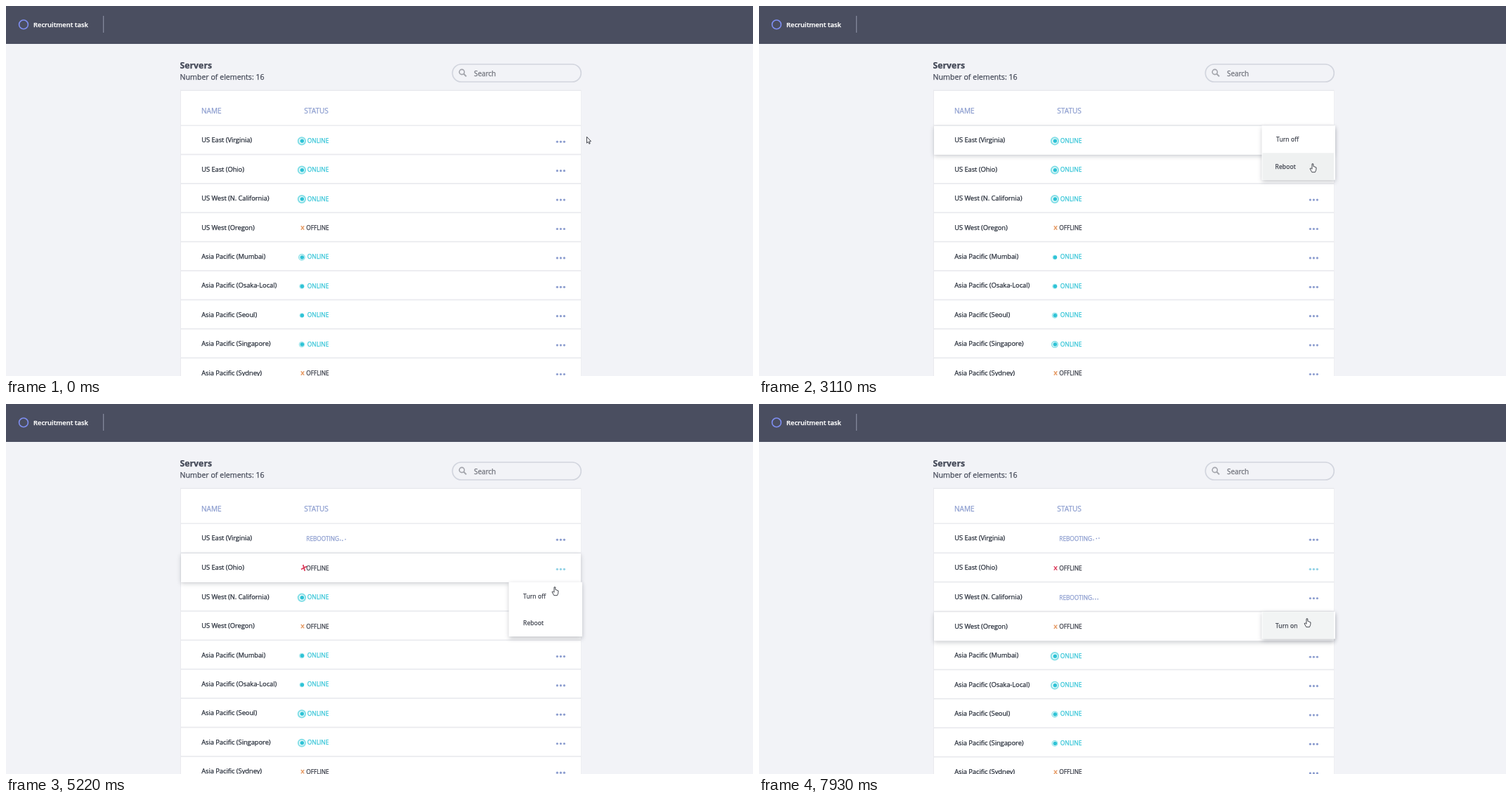
An HTML page with a canvas for the animation above (8000 ms loop, 1063x527 px).

```html
<!DOCTYPE html>
<html lang="en">
<head>
<meta charset="utf-8">
<title>Servers</title>
<style>
html, body { margin: 0; width: 100%; height: 100%; overflow: hidden; background: #f2f3f7; }
canvas { display: block; }
</style>
</head>
<body>
<canvas id="stage" width="1063" height="527"></canvas>
<script>
const c = document.getElementById('stage').getContext('2d');
const LOOP = 8000, TAU = Math.PI * 2;
const LEFT = 249, WIDTH = 569, TOP = 170, PITCH = 41.4, SHIFT = 0.67;
const FONT = '"Open Sans", sans-serif';
const TEAL = '#2fc3d6', BLUE = '#8c9dcf', INK = '#3b3f4a';

// Online servers pulse with a period and a time of the first peak
const servers = [
  { name: 'US East (Virginia)', period: 745, peak: 60 },
  { name: 'US East (Ohio)', period: 745, peak: 60 },
  { name: 'US West (N. California)', period: 745, peak: 60 },
  { name: 'US West (Oregon)' },
  { name: 'Asia Pacific (Mumbai)', period: 733, peak: 550 },
  { name: 'Asia Pacific (Osaka-Local)', period: 740, peak: 450 },
  { name: 'Asia Pacific (Seoul)', period: 810, peak: 420 },
  { name: 'Asia Pacific (Singapore)', period: 795, peak: 540 },
  { name: 'Asia Pacific (Sydney)' }
];

// Visit to each row in turn: pointer enters, menu opens, pointer reaches the
// second item, an item is clicked
const visits = [
  { enter: 700, open: 1500, second: 1900, click: 3550 },
  { enter: 3620, open: 3820, click: 4650 },
  { enter: 5290, open: 5100, second: 5330, click: 7450 },
  { enter: 7500, open: 7700, click: LOOP }
];

// Pointer moves: start, end, tip
const moves = [
  [420, 1150, 800, 191], [1310, 1450, 790, 192], [1600, 2000, 788, 224],
  [3520, 3900, 787, 231], [4680, 5000, 781, 260], [5220, 5600, 780, 305]
];

const ease = v => {
  v = Math.max(0, Math.min(1, v));
  return v * v * (3 - 2 * v);
};
const wave = turns => (1 + Math.cos(TAU * turns)) / 2;
const rebooted = (i, t) => (i === 0 || i === 2) && t >= visits[i].click;
const turnedOff = (i, t) => i === 1 && t >= visits[1].click;

// A rebooting row is a little taller
function rowY(i, t) {
  let y = TOP + i * PITCH;
  for (let k = 0; k < i; k++) if (rebooted(k, t)) y += SHIFT;
  return y;
}

// The thin outline gives small letters the weight of hinted type
function text(s, x, y, size, color, weight = 400, spacing = 0) {
  c.font = `${weight} ${size}px ${FONT}`;
  c.letterSpacing = spacing + 'px';
  c.fillStyle = c.strokeStyle = color;
  c.lineWidth = 0.25;
  c.fillText(s, x, Math.round(y));
  c.strokeText(s, x, Math.round(y));
}

function rect(x, y, w, h, color) {
  c.fillStyle = color;
  c.fillRect(x, y, w, h);
}

function disc(x, y, r, color) {
  c.fillStyle = color;
  c.beginPath();
  c.arc(x, y, r, 0, TAU);
  c.fill();
}

function ring(x, y, r, width, color) {
  c.strokeStyle = color;
  c.lineWidth = width;
  c.beginPath();
  c.arc(x, y, r, 0, TAU);
  c.stroke();
}

function line(x1, y1, x2, y2, width, color) {
  c.strokeStyle = color;
  c.lineWidth = width;
  c.beginPath();
  c.moveTo(x1, y1);
  c.lineTo(x2, y2);
  c.stroke();
}

function shadowBox(x, y, w, h, alpha) {
  c.save();
  c.shadowColor = `rgba(40,45,60,${alpha})`;
  c.shadowBlur = 6;
  c.shadowOffsetY = 2.5;
  rect(x, y, w, h, '#fff');
  c.restore();
}

function page() {
  rect(0, 0, 1063, 527, '#f2f3f7');
  rect(0, 0, 1063, 54, '#4a4e60');
  ring(25, 26.4, 6.4, 1.6, '#7f8ff2');
  text('Recruitment task', 39, 30, 9.38, '#fff', 600);
  rect(138, 14, 1.3, 24, '#83879a');
  text('Servers', 247.5, 89, 12.3, '#434857', 700);
  text('Number of elements: 16', 247.5, 105, 10.62, '#434857');
  c.beginPath();
  c.roundRect(635.3, 83, 183, 25, 12.5);
  c.strokeStyle = '#d2d5de';
  c.lineWidth = 1.7;
  c.stroke();
  ring(648.7, 94, 3.6, 1.6, '#a3a5ac');
  line(651.4, 96.8, 655, 100.4, 2, '#a3a5ac');
  text('Search', 666, 100, 9.9, '#6c6f78');
  rect(LEFT - 1, 119.5, WIDTH + 1.5, 410, '#e9eaee');
  rect(LEFT, 121, WIDTH, 48.5, '#fff');
  text('NAME', 278, 153, 10.1, BLUE);
  text('STATUS', 424.3, 153, 10.1, BLUE);
}

function cross(x, y, color, grow = 0) {
  c.save();
  c.translate(x + grow * 2, y - grow * 0.5);
  c.rotate(grow * 0.4);
  c.scale(1 + grow * 0.3, 1 + grow * 0.3);
  line(-2.2, -2.7, 2.2, 2.7, 1.4, color);
  line(2.2, -2.7, -2.2, 2.7, 1.4, color);
  c.restore();
}

function online({ period, peak }, y, t) {
  const v = wave((t - peak) / period), cy = y + 22.3;
  disc(420.9, cy, 3 + 2 * v, '#e9fafb');
  ring(420.9, cy, 3.1 + 2.2 * v, 0.5 + 1.6 * v, '#85dfe7');
  disc(421.3, cy, 2.75, TEAL);
  text('ONLINE', 428.8, y + 24.7, 8.38, TEAL);
}

function rebooting(y, t, start) {
  text('REBOOTING', 427.3, y + 25.2, 8.25, BLUE);
  const ramp = ease((t - start - 480) / 150);
  for (let k = 0; k < 3; k++) {
    const h = ramp * wave((t - 4100) / 820 + 0.19 * k);
    disc(475.5 + 3.3 * k + 1.8 * h, y + 24.4 - 3.4 * h, 0.85, BLUE);
  }
}

function status(i, y, t) {
  if (rebooted(i, t)) return rebooting(y, t, visits[i].click);
  const off = turnedOff(i, t);
  if (servers[i].period && !off) return online(servers[i], y, t);
  if (off) cross(422, y + 21.8, '#dc3c5c', 1 - ease((t - 5220) / 190));
  else cross(422, y + 21.8, '#e79d68');
  text('OFFLINE', 427.2, y + 24.9, 8.3, INK);
}

function row(i, t, lift = 0) {
  const y = rowY(i, t), h = rowY(i + 1, t) - y;
  if (lift) shadowBox(LEFT, y + 0.9, WIDTH, h - 0.4, 0.22 * lift);
  else rect(LEFT, y + 0.9, WIDTH, h - 1.7, '#fff');
  text(servers[i].name, 278.2, y + 24.4, 9.38, '#262d39', 400, -0.07);
  status(i, y, t);
  for (let k = 0; k < 3; k++) {
    disc(784.4 + 5 * k, y + 23.3, 1.6, turnedOff(i, t) ? '#91d1e5' : BLUE);
  }
}

function menu(i, t) {
  const { open, second = Infinity } = visits[i];
  const items = servers[i].period ? ['Turn off', 'Reboot'] : ['Turn on'];
  const y = rowY(i, t) + 0.3;
  const over = [open + 125, second];
  shadowBox(715.5, y, 104.5, 38.7 * items.length, 0.28);
  items.forEach((label, k) => {
    const left = k === 0 && t >= second;
    const a = left ? 0 : ease((t - over[k]) / 150);
    rect(716.5, y + 38.5 * k + 0.5, 101.5, 38, `rgba(239,241,241,${a})`);
    text(label, 736 - 1.4 * a, y + 23 + 38.3 * k, 8.45, INK, 400, 0.16);
  });
}

function poly(points) {
  c.beginPath();
  points.forEach(([x, y]) => c.lineTo(x, y));
  c.closePath();
  c.fill();
  c.stroke();
}

function pointer(t) {
  let x = 826, y = 186;
  for (const [from, to, tx, ty] of moves) {
    const k = ease((t - from) / (to - from));
    x += (tx - x) * k;
    y += (ty - y) * k;
  }
  c.save();
  c.translate(x, y);
  c.fillStyle = '#fff';
  c.strokeStyle = '#30343c';
  c.lineWidth = 0.9;
  c.lineJoin = 'round';
  if (t < 1350) {
    poly([[0.5, 0.3], [0.5, 9.2], [2.5, 7.4], [3.9, 10.4], [5.2, 9.8], [3.9, 6.9], [6.5, 6.7]]);
  } else {
    poly([[-1, 0.8], [0.8, 0.9], [0.9, 4.3], [5, 6], [4.7, 9.7],
      [3.4, 12.7], [-1.2, 12.7], [-4, 7.7], [-2.5, 7], [-1, 8.3]]);
  }
  c.restore();
}

function draw(t) {
  // The page stands still for a moment here
  if (t > 3110 && t < 3500) t = 3110;
  page();
  servers.forEach((_, i) => row(i, t));
  visits.forEach(({ enter }, i) => {
    const leave = visits[i + 1]?.enter ?? LOOP;
    const lift = ease((t - enter) / 200) * (1 - ease((t - leave) / 100));
    if (lift > 0) row(i, t, lift);
  });
  visits.forEach(({ open, click }, i) => {
    if (t >= open && t < click) menu(i, t);
  });
  pointer(t);
}

function tick() {
  draw(performance.now() % LOOP);
  requestAnimationFrame(tick);
}
tick();
</script>
</body>
</html>
```
